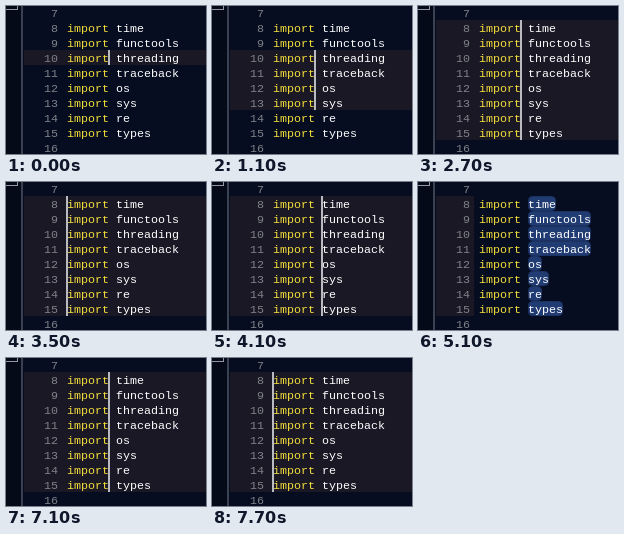
Recreate the animation shown at these times as an HTML page with a canvas. Size 200 px wide and 148 px high, loop 8 s.

```html
<!DOCTYPE html>
<html lang="en">
<head>
<meta charset="utf-8">
<title>Multiple cursors</title>
<style>
html, body { margin: 0; width: 100%; height: 100%; overflow: hidden; background: #060d21; }
canvas { display: block; }
</style>
</head>
<body>
<canvas id="stage" width="200" height="148"></canvas>
<script>
const ctx = document.getElementById('stage').getContext('2d');
const LOOP = 8000, ROW = 15, CHAR = 7, LEFT = 61;
const FIRST = 8, LAST = 15;
const KEYWORD = 'import';
const WORD_END = KEYWORD.length, NAME_START = WORD_END + 1;
const modules = ['time', 'functools', 'threading', 'traceback', 'os', 'sys', 're', 'types'];

const rowTop = line => 14 + (line - FIRST) * ROW;
const colX = col => LEFT + col * CHAR;

// Cursors spread down from line 10, then up to the first line
function cursorLines(time) {
  const from = 10 - (time >= 2100) - (time >= 2700);
  const down = time < 900 ? Number(time >= 500) : 2 + Math.floor((time - 900) / 200);
  return [from, Math.min(LAST, 10 + down)];
}

function cursorColumn(time) {
  if (time >= 7700) return 0;
  if (time >= 7100) return WORD_END;
  if (time >= 4100) return NAME_START;
  return time >= 3500 ? 0 : WORD_END;
}

function rect(x, y, w, h, color) {
  ctx.fillStyle = color;
  ctx.fillRect(x, y, w, h);
}

function write(text, x, line, color) {
  ctx.fillStyle = color;
  [...text].forEach((ch, i) => ctx.fillText(ch, x + i * CHAR, rowTop(line) + 12));
}

function selectWord(line, word) {
  ctx.beginPath();
  ctx.roundRect(colX(NAME_START) + 0.5, rowTop(line) + 0.5, word.length * CHAR - 1, ROW - 1, 4);
  ctx.fillStyle = '#213c73';
  ctx.strokeStyle = '#1b3262';
  ctx.fill();
  ctx.stroke();
}

function drawPanelEdge() {
  rect(0, 0, 15, 148, '#050a19');
  rect(15, 0, 2, 148, '#3a4150');
  rect(0, 3, 12, 1, '#9297a1');
  rect(11, 0, 1, 4, '#9297a1');
}

function draw(time) {
  const [from, to] = cursorLines(time);
  const selected = time >= 5100 && time < 6100;
  const top = rowTop(from), height = (to - from + 1) * ROW;

  rect(0, 0, 200, 148, '#060d21');
  drawPanelEdge();
  rect(18, top, selected ? 38 : 182, height, '#1b1826');

  ctx.font = '11.67px "Liberation Mono", "DejaVu Sans Mono", monospace';
  for (let line = FIRST - 1; line <= LAST + 1; line++) {
    const label = String(line);
    write(label, 52 - label.length * CHAR, line, '#7f8389');
    const word = modules[line - FIRST];
    if (!word) continue;
    if (selected) selectWord(line, word);
    write(KEYWORD, LEFT, line, '#f4df3c');
    write(word, colX(NAME_START), line, '#ffffff');
  }
  if (!selected) rect(colX(cursorColumn(time)) - 1, top, 2, height, '#babbc0');
}

function tick() {
  draw(performance.now() % LOOP);
  requestAnimationFrame(tick);
}
tick();
</script>
</body>
</html>
```
